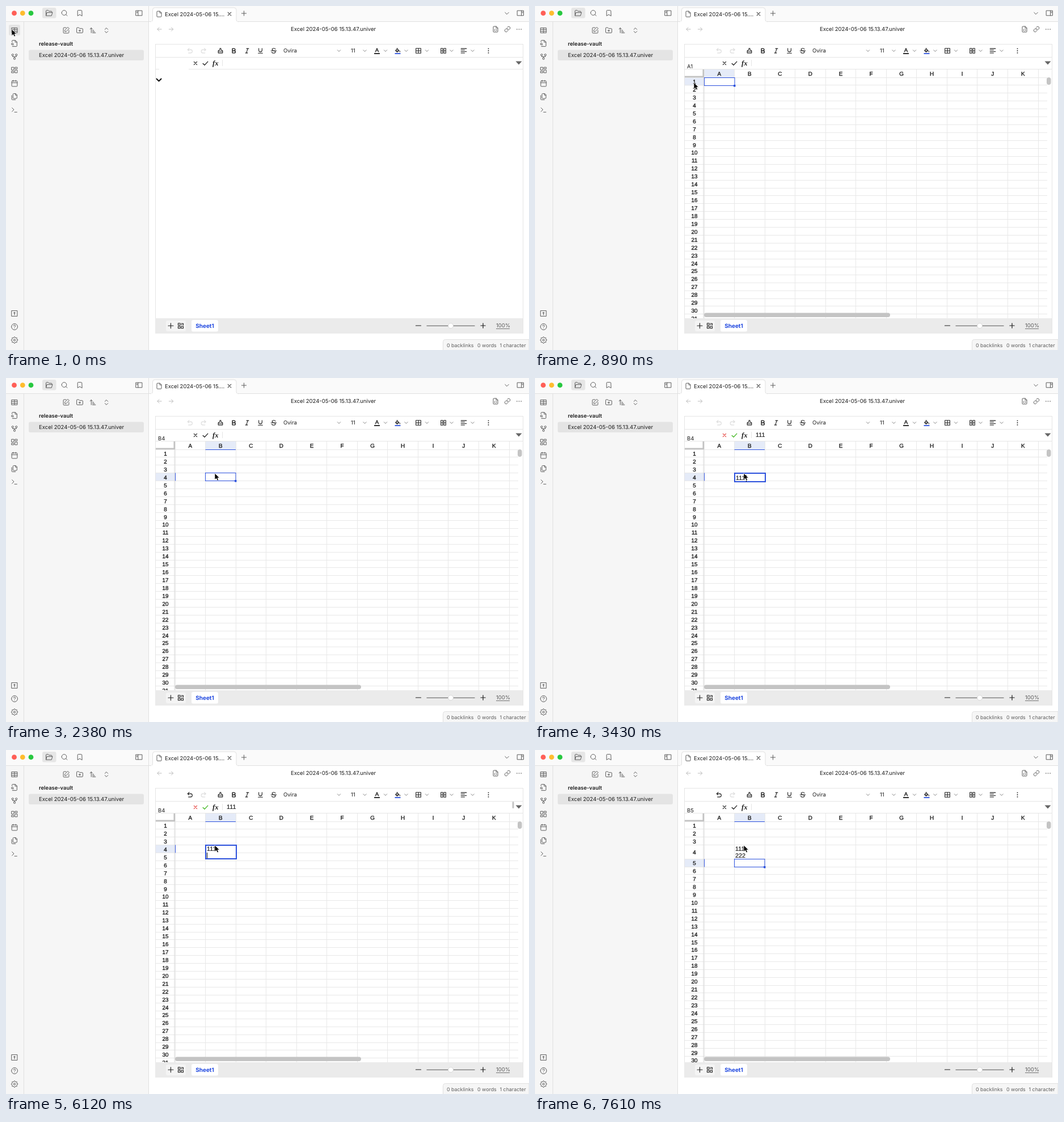
Recreate the animation shown at these times as an HTML page. Size 922 px wide and 607 px high, loop 8 s.

```html
<!DOCTYPE html>
<html lang="en">
<head>
<meta charset="utf-8">
<title>Spreadsheet in a vault</title>
<style>
  html, body { margin: 0; width: 100%; height: 100%; overflow: hidden; background: #fff; }
  svg { display: block; width: 100%; height: 100%; }
  text { font-family: Inter, sans-serif; white-space: pre; text-rendering: geometricPrecision; }
  .cell { font-family: "Liberation Sans", sans-serif; stroke: #1c1c1c; stroke-width: .2; }
  .head { font-family: "Liberation Sans", sans-serif; stroke: #1c1c1c; stroke-width: .35; text-anchor: middle; }
  .serif { font-family: "Liberation Serif", serif; font-style: italic; font-weight: bold; }
</style>
</head>
<body>
<svg viewBox="0 0 922 607">
  <defs><clipPath id="formula"><path d="M382 91h528v20H382z"/></clipPath>
  <clipPath id="grid"><path d="M264 112h647v439H264z"/></clipPath></defs>
  <g id="frame"></g><g id="live"></g>
</svg>
<script>
const LOOP = 8000;
const BLUE = '#2b50dc', INK = '#1c1c1c', GRAY = '#5c5c5c', FAINT = '#dcdcdc', LINE = '#e5e5e5', PANEL = '#f6f6f6', HEADER = '#fafafa';
const FILE = 'Excel 2024-05-06 15.13.47.univer';

const gear = 'M' + Array.from({ length: 32 }, (_, i) => {
  const r = i % 4 < 2 ? 10.5 : 8, a = (i - 0.5) * Math.PI / 16;
  return `${(12 + r * Math.cos(a)).toFixed(1)} ${(12 + r * Math.sin(a)).toFixed(1)}`;
}).join('L') + 'z';
const ring = (x, y, r) => `M${x - r} ${y}a${r} ${r} 0 1 0 ${2 * r} 0a${r} ${r} 0 1 0 ${-2 * r} 0`;

// Icon outlines on a 24-unit grid
const ICONS = {
  table: 'M3 4h18v16H3zM12 4v16M3 9h18M3 15h18',
  fileSearch: 'M14 2v6h6M5 22h13a2 2 0 0 0 2-2V7l-5-5H6a2 2 0 0 0-2 2v3M9 18l-2-2' + ring(5, 14, 3),
  fork: ring(12, 18, 3) + ring(6, 6, 3) + ring(18, 6, 3) + 'M18 9v3H6V9M12 12v3',
  dashboard: 'M3 3h7v9H3zM14 3h7v5h-7zM14 12h7v9h-7zM3 16h7v5H3z',
  calendar: 'M5 4h14a2 2 0 0 1 2 2v14a2 2 0 0 1-2 2H5a2 2 0 0 1-2-2V6a2 2 0 0 1 2-2zM16 2v4M8 2v4M3 10h18',
  files: 'M15.5 2H9a2 2 0 0 0-2 2v12a2 2 0 0 0 2 2h9a2 2 0 0 0 2-2V6.500zM3 8v12a2 2 0 0 0 2 2h10M15 2v5h5',
  terminal: 'M4 17l6-6-6-6M12 19h8',
  vault: 'M3 3h18v18H3zM12 12v5' + ring(12, 10, 2),
  help: ring(12, 12, 10) + 'M9 9a3 3 0 0 1 6 1c0 2-3 3-3 3M12 17h.01',
  settings: gear + ring(12, 12, 3),
  folder: 'M2 20V5a2 2 0 0 1 2-2h5l3 3h7a2 2 0 0 1 2 2v2M2 20l3-10h18l-3 10z',
  folderPlus: 'M4 20a2 2 0 0 1-2-2V5a2 2 0 0 1 2-2h5l3 3h8a2 2 0 0 1 2 2v10a2 2 0 0 1-2 2zM12 10v6M9 13h6',
  search: ring(11, 11, 8) + 'M21 21l-4.300-4.300',
  bookmark: 'M19 21l-7-4-7 4V5a2 2 0 0 1 2-2h10a2 2 0 0 1 2 2z',
  panelLeft: 'M2 4h20v16H2zM9 4v16M4.500 8h2M4.500 11h2',
  panelRight: 'M2 4h20v16H2zM15 4v16M17.500 8h2M17.500 11h2',
  edit: 'M12 3H5a2 2 0 0 0-2 2v14a2 2 0 0 0 2 2h14a2 2 0 0 0 2-2v-7M18 2l4 4-10 10H8v-4z',
  sort: 'M3 8l4-4 4 4M7 4v16M11 12h4M11 16h7M11 20h10',
  unfold: 'M7 15l5 5 5-5M7 9l5-5 5 5',
  file: 'M14 2H6a2 2 0 0 0-2 2v16a2 2 0 0 0 2 2h12a2 2 0 0 0 2-2V8zM14 2v6h6',
  fileCode: 'M14 2H6a2 2 0 0 0-2 2v16a2 2 0 0 0 2 2h12a2 2 0 0 0 2-2V8zM14 2v6h6M10 12l-2 3 2 3M14 12l2 3-2 3',
  link: 'M10 13a5 5 0 0 0 7.500.5l3-3a5 5 0 0 0-7-7l-2 2M14 11a5 5 0 0 0-7.500-.5l-3 3a5 5 0 0 0 7 7l2-2',
  close: 'M5 5l14 14M19 5L5 19',
  plus: 'M3 12h18M12 3v18',
  minus: 'M3 12h18',
  down: 'M5 8.500l7 7 7-7',
  left: 'M20 12H4M11 5l-7 7 7 7',
  right: 'M4 12h16M13 5l7 7-7 7',
  dots: 'M4 12h.01M12 12h.01M20 12h.01',
  dotsV: 'M12 4h.01M12 12h.01M12 20h.01',
  undo: 'M9 3L3 8l5 5M3 8h11a6 6 0 0 1 0 12H6',
  redo: 'M15 3l6 5-5 5M21 8H10a6 6 0 0 0 0 12h8',
  brush: 'M10 3h4v5l6 4v8H4v-8l6-4zM4 14h16',
  bold: 'M7 4h6a4 4 0 0 1 0 8H7zM7 12h7a4 4 0 0 1 0 8H7z',
  italic: 'M18 4h-8M14 20H6M14.500 4l-5 16',
  underline: 'M6 3v7a6 6 0 0 0 12 0V3M4 21h16',
  strike: 'M18 6c-1-4-12-4-12 1 0 3 3 4 6 5 4 1 7 2 6 5-1 5-12 5-13 0M2 12h20',
  letter: 'M6 16l6-13 6 13M8 12h8',
  bucket: 'M10 2v5M10 5l7 6-7 6-6-6zM6 12h10M20 13v3',
  borders: 'M3 3h18v18H3zM3 12h18M12 3v18',
  merge: 'M10 3H3v18h7zM14 3h7v18h-7zM3 12h7M14 12h7',
  align: 'M2 4h20M2 9.500h13M2 15h20M2 20.500h13',
  check: 'M3 13l6 6L21 6',
  sheets: 'M3 3h7v7H3zM14 14h7v7h-7zM3 14v7h7v-7zM14 4h7v6M14 8h3',
};

const icon = (name, x, y, size = 13, color = GRAY, weight = 1) =>
  `<path transform="translate(${x - size / 2} ${y - size / 2}) scale(${size / 24})" d="${ICONS[name]}" fill="none" stroke="${color}" stroke-width="${weight * 24 / size}" stroke-linecap="round" stroke-linejoin="round"/>`;
const rect = (x, y, w, h, fill, extra = '') => `<rect x="${x}" y="${y}" width="${w}" height="${h}" fill="${fill}" ${extra}/>`;
const path = (d, stroke = LINE, extra = '') => `<path d="${d}" fill="none" stroke="${stroke}" ${extra}/>`;
const text = (s, x, mid, size = 9.5, extra = '') => `<text x="${x}" y="${mid + size * 0.36}" font-size="${size}" fill="${INK}" ${extra}>${s}</text>`;
const each = (list, draw) => list.map(draw).join('');

function drawFrame() {
  const column = (x, items) => each(items, ([name, y]) => icon(name, x, y));
  const row = (y, items, color) => each(items, ([name, x, size]) => icon(name, x, y, size, color));
  return rect(0, 0, 922, 607, '#fff') + rect(0, 27, 251, 580, PANEL) + rect(0, 0, 922, 27, HEADER) +
    path('M0 27.500H922M31.500 27V607M251.500 0V607', '#e0e0e0') +
    `<path d="M255 28q3.500 0 3.500-4V7q0-4 4-4H402q4 0 4 4V24q0 4 3.500 4" fill="#fff" stroke="#e0e0e0"/>` +
    rect(256, 27, 152, 2, '#fff') +
    each([['#ff5f57', 14.5], ['#febc2e', 29.3], ['#28c840', 44]], ([c, x]) => `<circle cx="${x}" cy="12.700" r="4.400" fill="${c}"/>`) +
    rect(64, 3, 24.5, 18.5, '#e6e6e6', 'rx="3"') +
    row(12.5, [['folder', 76], ['search', 103], ['bookmark', 130], ['panelLeft', 234.5]]) +
    row(43, [['edit', 106], ['folderPlus', 130], ['sort', 153], ['unfold', 177]]) +
    column(15, [['fileSearch', 66], ['fork', 89.5], ['dashboard', 113], ['calendar', 136.5], ['files', 160], ['terminal', 183.5],
      ['vault', 542.5], ['help', 566], ['settings', 589.5]]) +
    text('release-vault', 58, 67, 9.4, 'font-weight="600"') +
    rect(40, 77.5, 203, 18.5, '#e4e4e4', 'rx="3"') + text(FILE, 58, 86.7, 9.55) +
    icon('file', 270, 14.2, 12) + text('Excel 2024-05-06 15....', 280, 14.2) + icon('close', 394, 14, 9.5, GRAY, 1.2) +
    icon('plus', 419.5, 13, 11) + icon('down', 883, 13, 11) + icon('panelRight', 907, 12.5) +
    row(41, [['left', 270.5, 11], ['right', 291, 11]], '#bdbdbd') +
    row(41, [['fileCode', 863, 12], ['link', 884, 12]]) + icon('dots', 904.5, 41, 11, GRAY, 1.7) +
    text(FILE, 577, 41, 9.55, 'text-anchor="middle"') +
    rect(263.5, 67.5, 648, 510, '#fff', `stroke="${LINE}"`) + path('M264 90.500H911M381.500 95V106') +
    `<path d="M898.500 97.500h11l-5.500 6z" fill="#666"/>` + text('fx', 364, 100.2, 12.5, 'class="serif"') +
    rect(263, 551, 648, 27, '#ebebeb') + rect(282, 555, 35, 19, '#f4f4f4', 'rx="3"') + rect(327, 554, 47, 20.5, '#fff', 'rx="3"') +
    text('Sheet1', 350.5, 564.3, 10, `text-anchor="middle" font-weight="700" style="fill:#2149e0"`) +
    icon('plus', 290.5, 564.3, 12, INK, 1.1) + icon('sheets', 308, 564.3, 12, INK, 1.1) +
    icon('minus', 727, 564, 12, INK, 1.2) + icon('plus', 841, 564, 11, INK, 1.2) +
    path('M741.500 564.300H826.500', '#555') + `<circle cx="784" cy="564.300" r="4.500" fill="#fff" stroke="#ccc" stroke-width=".7"/>` +
    text('100%', 864, 564, 9.5, `style="fill:${GRAY}"`) + path('M864 569.500h24', '#555', 'stroke-width=".8"') +
    `<path d="M770.500 607V592.500q0-4 4-4H922V607" fill="${PANEL}" stroke="#e0e0e0"/>` +
    each([['0 backlinks', 777], ['0 words', 831], ['1 character', 870.5]], ([s, x]) => text(s, x, 598.5, 8.85, `style="fill:${GRAY}"`));
}

const tool = (name, x, color = INK) => icon(name, x, 79, 11.5, color, name === 'bold' ? 1.4 : 1.1);
const tools = list => each(list, item => tool(...item));
const chevrons = xs => each(xs, x => icon('down', x, 79, 9, '#777', 0.9));
const swatch = (x, color) => rect(x - 5, 83, 10, 1.8, color);

function toolbar(overflowing, canUndo) {
  if (overflowing) {
    return text('11', 268, 79) + text('X₂', 513, 79) + text('X²', 536, 79) + text('0', 566, 79) + text('fontFamily.undefi...', 604, 79) +
      tools([['letter', 314], ['bucket', 350.5], ['borders', 387], ['bold', 423.5], ['italic', 447], ['underline', 470.5], ['strike', 494],
        ['letter', 723], ['bucket', 760], ['merge', 803], ['align', 840], ['align', 876], ['align', 900]]) +
      swatch(314, INK) + each([350.5, 723, 760], x => swatch(x, BLUE)) +
      chevrons([292.5, 329, 365.5, 402, 589, 702, 738.5, 775, 818, 855]);
  }
  return text('Ovira', 489, 79) + text('11', 608, 79) +
    tools([['undo', 324.5, canUndo ? INK : FAINT], ['redo', 348, FAINT], ['brush', 378], ['bold', 401.5], ['italic', 425], ['underline', 448.5],
      ['strike', 472], ['letter', 654], ['bucket', 690.5], ['borders', 727], ['merge', 771], ['align', 807]]) +
    swatch(654, INK) + swatch(690.5, BLUE) + icon('dotsV', 850.5, 79, 11, INK, 1.9) +
    chevrons([587, 632.5, 669, 705.5, 742, 785.5, 822.5]);
}

const colX = c => 298 + 53.55 * c;
const snap = v => Math.round(v) + 0.5;
const heading = (s, x, mid) => text(s, x, mid, 9.9, 'class="head"');

function grid(col, row, tall, selected) {
  const rowY = r => 126 + 13.93 * r + (tall && r > 3 ? 10.4 : 0);
  const x = snap(colX(col) - 0.5), y = snap(rowY(row) - 0.5), w = 53.5, h = rowY(row + 1) - rowY(row);
  let out = rect(x, 112, w, 14, '#e5ebf8') + rect(264, y, 33, h, '#e5ebf8'), lines = 'M264 126.500H903';
  for (let c = 0; c < 12; c++) {
    lines += `M${snap(colX(c) - 0.5)} 112V551`;
    if (c < 11) out += heading('ABCDEFGHIJK'[c], colX(c + 0.5), 119.5);
  }
  for (let r = 0; r < 31; r++) {
    lines += `M264 ${snap(rowY(r + 1) - 0.5)}H903`;
    out += heading(r + 1, 281, (rowY(r) + rowY(r + 1)) / 2 + 0.6);
  }
  out += path(lines, '#e8e8e8', 'shape-rendering="crispEdges"') + path('M297 126V551', '#d8d8d8') +
    rect(264, 123.5, 34, 2.5, '#c2c2c2') + rect(295.5, 112, 2.5, 14, '#c2c2c2') +
    path(`M${x} 126.500h${w}M298.500 ${y}v${h}`, BLUE);
  if (selected) out += rect(x, y, w, 14, '#fff', `stroke="${BLUE}"`) + rect(x + w - 2, y + 12.5, 3.5, 3.5, BLUE);
  out += rect(298, 541.5, 328, 7.5, '#c4c4c4', 'rx="3.750"') + rect(902, 126, 7.5, 13, '#c4c4c4', 'rx="3.750"');
  return `<g clip-path="url(#grid)">${out}</g>`;
}

const cellText = (s, x, mid) => text(s, x, mid, 10.8, 'class="cell"');

function editor(first, second, twoLines, caret) {
  let out = rect(352, 168, 54, twoLines ? 24 : 15, '#fff', `stroke="${BLUE}" stroke-width="2"`) +
    cellText(first, 354, twoLines ? 174.6 : 176) + cellText(second, 354, 186.2);
  const caretX = 354.5 + 6 * (twoLines ? second : first).length;
  if (caret) out += path(twoLines ? `M${caretX} 181v10` : `M${caretX} 171v12`, '#000');
  out += `<g clip-path="url(#formula)">${cellText(first, 389, 100.5)}${cellText(second, 389, 112)}</g>`;
  return twoLines ? out + rect(892.5, 91, 3, 12, '#c4c4c4', 'rx="1.500"') : out;
}

// Pointer tip as [start time, x, y]
const POINTER = [[0, 10, 41], [150, 172, 79], [300, 190, 88], [450, 199, 93], [890, 280, 135], [1040, 357, 175],
  [1190, 341, 162], [1640, 351, 153], [1790, 358, 159], [1930, 364, 165], [2080, 368, 168]];
const BLINKS = [3880, 4330, 4930, 5380, 5820, 6120, 6570, 7020];
const passed = (times, t) => times.filter(at => t >= at).length;

function drawLive(t) {
  const loaded = t >= 150, editing = t >= 3130 && t < 7610, done = t >= 7610, moved = t >= 2380;
  const first = '1'.repeat(passed([3130, 3280, 3430], t));
  const second = '2'.repeat(passed([7020, 7170, 7310], t));
  const [, px, py] = POINTER[passed(POINTER.map(p => p[0]), t) - 1];
  let out = loaded ? '' : rect(5, 33, 20, 19, '#e4e4e4', 'rx="3"');
  out += icon('table', 15, 43) + toolbar(loaded && t < 300, t >= 3730) +
    path(loaded ? 'M264 111.500H911' : 'M264 111.500h6M322 111.500H911') +
    icon('close', 334, 101, 9, editing ? '#e5403c' : INK, 1.2) + icon('check', 351.5, 101, 11.5, editing ? '#3fb61f' : INK, 1.3);
  if (loaded) {
    out += text(done ? 'B5' : moved ? 'B4' : 'A1', 268, 106.3) + grid(moved ? 1 : 0, done ? 4 : moved ? 3 : 0, done, !editing);
  } else {
    out += icon('down', 269.5, 130.5, 14, '#111', 2);
  }
  if (editing) out += editor(first, second, t >= 6120, passed(BLINKS, t) % 2 === 0);
  if (done) out += cellText(first, 353, 174.3) + cellText(second, 353, 185.8);
  return out + `<path transform="translate(${px} ${py})" d="M0 0V11.500L2.700 9l1.800 4 2.100-1-1.700-3.800H8.400z" fill="#000" stroke="#fff" stroke-width=".7"/>`;
}

const live = document.getElementById('live');
let shown = '';
function tick() {
  const next = drawLive(performance.now() % LOOP);
  if (next !== shown) live.innerHTML = shown = next;
  requestAnimationFrame(tick);
}
document.getElementById('frame').innerHTML = drawFrame();
tick();
</script>
</body>
</html>
```
